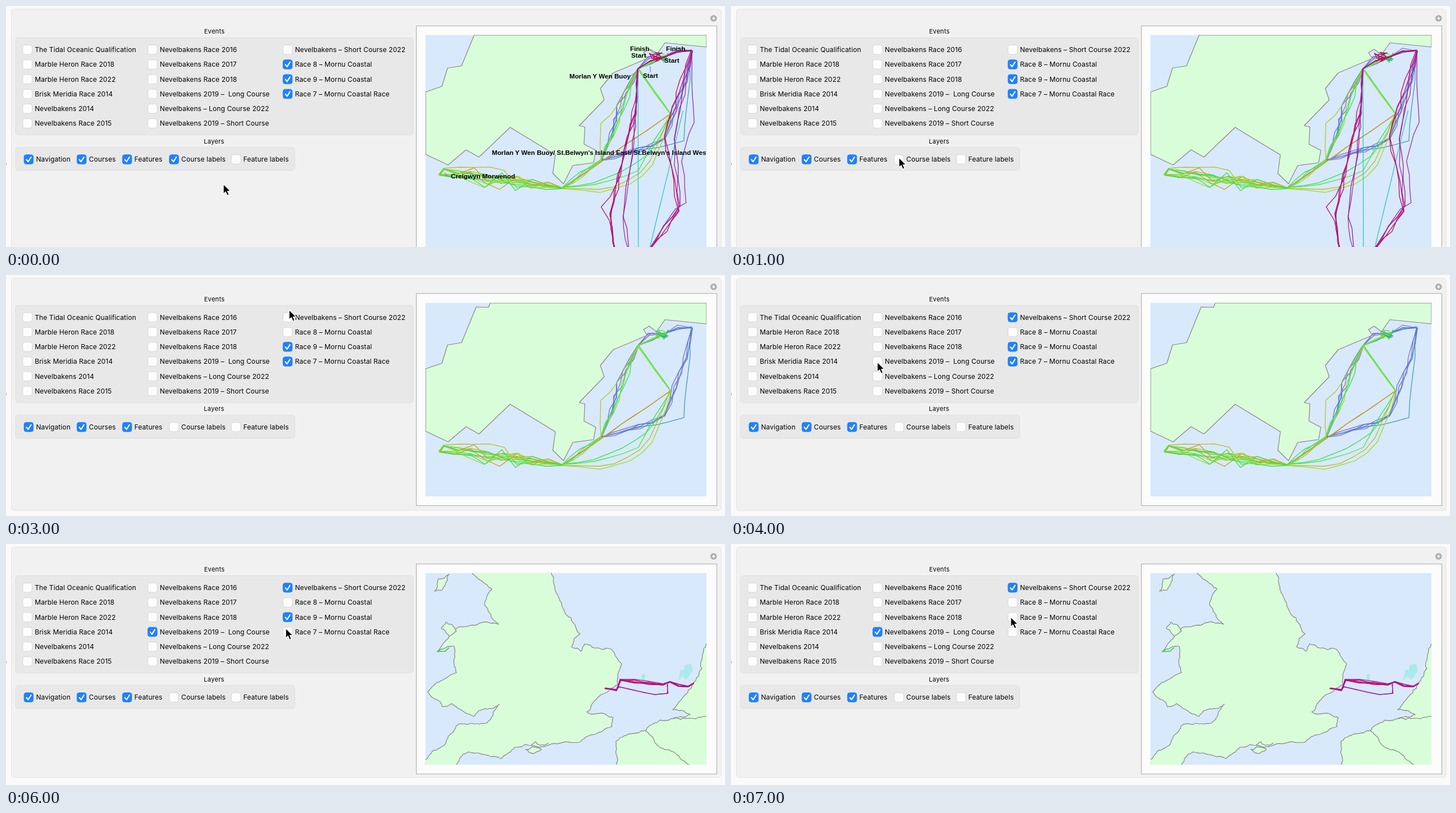
Animation, 1280 px wide and 429 px high, one loop 8000 ms. Source, as an HTML page:

```html
<!DOCTYPE html>
<html lang="en">
<head>
<meta charset="utf-8">
<title>Race map explorer</title>
<style>
  html, body { margin: 0; width: 100%; height: 100%; overflow: hidden; background: #fafafa; }
  svg { display: block; width: 1280px; height: 429px; }
  text { font: 12px Inter, sans-serif; letter-spacing: .1px; fill: #000; white-space: pre; }
  .head { font-size: 11px; text-anchor: middle; letter-spacing: .3px; }
  .place { font: bold 11.7px "Liberation Sans", sans-serif; letter-spacing: 0; }
  .land { fill: #dafdd9; stroke: #858585; stroke-width: 1.2; stroke-linejoin: round; }
  .line { fill: none; stroke: #858585; stroke-width: 1.2; }
  .track { fill: none; stroke-width: 1.3; stroke-linejoin: round; }
</style>
</head>
<body>
<svg id="stage" viewBox="0 0 1280 429"></svg>
<script>
const STEP = 1000;
const events = [
  'The Tidal Oceanic Qualification', 'Marble Heron Race 2018', 'Marble Heron Race 2022',
  'Brisk Meridia Race 2014', 'Nevelbakens 2014',
  ...[2015, 2016, 2017, 2018].map(year => `Nevelbakens Race ${year}`),
  'Nevelbakens 2019 –  Long Course', 'Nevelbakens – Long Course 2022', 'Nevelbakens 2019 – Short Course',
  'Nevelbakens – Short Course 2022', 'Race 8 – Mornu Coastal', 'Race 9 – Mornu Coastal',
  'Race 7 – Mornu Coastal Race'];
const columns = [38.2, 260.8, 501.4];
const layers = [['Navigation', 40.4], ['Courses', 134.6], ['Features', 215.6],
  ['Course labels', 299.1], ['Feature labels', 409.6]];

// Panel geometry for each of the three views
const views = {
  bay:   { shift: 0,    panel: 460,   frame: [35.5, 460],   map: [51.5, 460], mark: 281 },
  coast: { shift: -2.4, panel: 419,   frame: [33, 410.5],   map: [49.5, 394], mark: 212 },
  sea:   { shift: 0,    panel: 415.5, frame: [35.5, 409.3], map: [51.5, 393], mark: 210 }
};
const states = [
  { view: 'bay',   cursor: [387, 317], on: [13, 14, 15], labels: true },
  { view: 'bay',   cursor: [299, 270], on: [13, 14, 15] },
  { view: 'bay',   cursor: [471, 115], on: [13, 14, 15] },
  { view: 'coast', cursor: [504, 62],  on: [14, 15] },
  { view: 'coast', cursor: [260.5, 155], on: [12, 14, 15] },
  { view: 'sea',   cursor: [498, 150], on: [9, 12, 14, 15] },
  { view: 'sea',   cursor: [498, 150], on: [9, 12, 14] },
  { view: 'sea',   cursor: [498, 130], on: [9, 12] }
];

let seed = 11;
const random = () => (seed = seed * 16807 % 2147483647) / 2147483647;
const spread = size => (random() - .5) * 2 * size;
const parse = text => text.split(' ').map(pair => pair.split(',').map(Number));
const join = points => points.map(p => p.map(v => v.toFixed(1)).join()).join(' ');

const rect = (x, y, w, h, fill, extra = '') =>
  `<rect x="${x}" y="${y}" width="${w}" height="${h}" fill="${fill}" ${extra}/>`;
const label = (x, y, text, kind = '') => `<text x="${x}" y="${y}" class="${kind}">${text}</text>`;
const shape = (tag, kind, points, extra = '') => `<${tag} class="${kind}" points="${points}" ${extra}/>`;
const track = (points, color) => shape('polyline', 'track', join(points), `stroke="#${color}"`);

// Sail from stop to stop, drifting sideways most in the middle of each leg
function sail(stops, wander, bow) {
  const marks = stops.map(([x, y]) => [x + spread(1.3), y + spread(1.3)]);
  return marks.flatMap(([x, y], i) => {
    if (!marks[i + 1]) return [[x, y]];
    const dx = marks[i + 1][0] - x, dy = marks[i + 1][1] - y, length = Math.hypot(dx, dy);
    const count = Math.ceil(length / 28);
    return Array.from({ length: count }, (_, k) => {
      const u = k / count, side = Math.sin(Math.PI * u) * (bow + spread(wander)) / length;
      return [x + dx * u - dy * side, y + dy * u + dx * side];
    });
  });
}
const fleet = (stops, colors, wander = 2, bow = 0) => colors.split(' ').map((color, i, all) =>
  track(sail(stops, wander, bow * (.6 + .4 * i / Math.max(1, all.length - 1))), color)).join('');

const scribble = (x, y, w, h, colors) => colors.split(' ').map(color =>
  track(Array.from({ length: 9 }, () => [x + spread(w), y + spread(h)]), color)).join('');

// Midpoint displacement turns a coarse outline into a ragged coast
function ragged(text, amount = .14, depth = 4) {
  let points = parse(text);
  while (depth--) points = points.flatMap((a, i) => {
    const b = points[i + 1];
    if (!b) return [a];
    const size = Math.min(Math.hypot(b[0] - a[0], b[1] - a[1]), 26) * amount;
    return [a, [(a[0] + b[0]) / 2 + spread(size), (a[1] + b[1]) / 2 + spread(size)]];
  });
  return join(points);
}
const coast = text => shape('polygon', 'land', ragged(text));
const border = text => shape('polyline', 'line', ragged(text));

// Marks of the bay course
const [start, mole, buoy, turn, bend, isle, cape, west, hook] =
  parse('1172,105 1221,93 1125,126 1183,206 1172,250 1060,288 990,338 772,314 779,304');
const south = [1147, 446];
const blues = '786bcc 6b72cf 8577c8 4f82cc', reds = 'b8006e c30061', purples = '9c2ea8 a5168c';
const greens = '2fe252 49e63f 8bdc2c', olives = 'c0a028 bdbc22 9bd922';

const bayMap = shape('polygon', 'land',
    '747,167 776,157 786,124.5 811,120.5 837,57 859,57.5 866,40 1247,40 1247,87 1173,79.5 1158,101 ' +
    '1145,91 1135,97 1140,105 1152,103 1081,133 1058,161 1065,181 1020.5,227 1030.5,229.5 ' +
    '1029,260 1050,271 1046,293 1009,298 992.5,330.5 973.5,312 978,279 897.5,230 842,283 819,270 787,297 747,278') +
  fleet([start, mole, [1206, 254], isle], '3e9cba', 3) +
  fleet([start, mole, bend, isle], blues, 6, -6) +
  fleet([isle, buoy, start], blues, 9, -6) +
  fleet([turn, cape], 'be902b c0a028', 1) +
  fleet([turn, cape], '2fe252 49e63f bdbc22 9bd922', 5, -64) +
  fleet([cape, west, hook, cape], greens, 4) +
  fleet([cape, west, hook, cape], olives + ' 2fe252', 17) +
  fleet([cape, isle, buoy], greens, 6) +
  fleet([isle, [1060, 222], [1076, 207], buoy], 'b4c823', 3) +
  fleet([start, buoy, turn], greens, 1) +
  scribble(1167, 106, 14, 9, 'b4c823 49e63f 2fae98');

const redTracks =
  fleet([buoy, [1126, 460]], '2cc6c8', 0) +
  fleet([[1206, 200], south], '2cc6c8', 0) +
  fleet([start, buoy, [1121, 205], [1100, 268], [1076, 385], [1088, 460]], reds + ' a20c78', 5) +
  fleet([buoy, [1086, 330], [1060, 373], [1082, 450]], 'b0147b', 4, -8) +
  fleet([buoy, [1116, 279], [1098, 390], [1109, 450]], purples, 4) +
  fleet([start, mole, [1172, 245], [1198, 379], south], reds, 6) +
  fleet([mole, [1224, 220], [1203, 290], [1211, 365], [1191, 375], south], '9c2ea8', 3) +
  fleet([mole, [1190, 250], [1200, 370], south], purples, 5) +
  scribble(1160, 105, 16, 9, reds);

const harbour = parse('1067,257 1087,260 1094,242 1170,250 1182,245 1214,254 1224,248');
const seaMap =
  coast('829,50 865,80 852,109 877,143 803,149 768,191 798,182 802,229 751,263 777,290 793,284 833,307 ' +
    '878,285 855,319 801,324 783,354 745,384 745,395 802,395 823,370 881,382 906,362 1020,353 1079,325 ' +
    '1081,309 1034,299 1060,268 1089,250 1096,214 1077,187 1030,178 1023,191 1007,183 1022,160 985,97 970,50') +
  coast('775,150 783,139 802,155 789,164 775,150') +
  coast('789,54 770,62 763,84 776,82 789,54') +
  coast('925,366 939,361 953,366 940,373 925,366') +
  coast('1250,168 1233,236 1208,270 1187,295 1218,304 1187,311 1165,313 1140,331 1086,351 1087,395 1250,395') +
  border('1138,332 1166,363 1189,370 1219,394') +
  border('1187,311 1211,311 1247,307') +
  border('935,358 943,352 950,358 966,354') +
  '<path fill="#ace9ea" d="M1131 233l7-2-1 13-4 6zM1197 243l4-20 6 2 1-9 12-3 3 12-12 17-7-7z"/>' +
  fleet([[768, 192], [782, 192], [788, 184]], greens + ' 2fe252', 2) +
  fleet(harbour, 'd00066 c60070 a31386 d00066 b60a7a d00066 8c27a0', 4) +
  fleet([harbour[1], [1092, 254], [1155, 267], [1178, 267], [1178, 250]], 'b60a9a 9a20a0', 1);

const names = ['Morlan Y Wen Buoy', "St.Belwyn's Island East", "St.Belwyn's Island West"];
const places = [[1111, 80, 'Finish'], [1113, 92, 'Start'], [1175, 80, 'Finish'], [1172, 100.5, 'Start'],
  [1134, 127.5, 'Start'], [1003, 129, names[0]], [865, 265, names.join('/ ')], [792, 307, 'Creigwyn Morwenod']]
  .map(p => label(...p, 'place')).join('') +
  '<path class="line" d="M781 297l5 6h5M1112 125l10-8M1147 118v-11M1146 77l12 6"/>';

function checkbox(x, y, on) {
  const box = rect(x - 8.3, y - 8.3, 16.6, 16.6, on ? '#1f82fb' : '#fdfdfd',
    `rx="4" stroke="${on ? '#1f7cf2' : '#cfcfcf'}" stroke-width=".8"`);
  return box + (on ? `<path d="M${x - 4} ${y + .5}l3 3.7 5.2-8.2" fill="none" stroke="#fff" stroke-width="2.1"
    stroke-linecap="round" stroke-linejoin="round"/>` : '');
}

function controls(state) {
  const edge = 'rx="5" stroke="#dedede"';
  const option = (x, y, text, on) => checkbox(x, y, on) + label(x + 13, y + 4.4, text);
  return label(371, 49, 'Events', 'head') + label(370.5, 244.5, 'Layers', 'head') +
    rect(17, 56.5, 708, 173, '#e8e8e8', edge) + rect(17, 251.8, 497, 41, '#e8e8e8', edge) +
    events.map((name, i) =>
      option(columns[i / 6 | 0], 77.7 + i % 6 * 26.25, name, state.on.includes(i))).join('') +
    layers.map(([name, x], i) => option(x, 273, name, i < 3 || i === 3 && state.labels)).join('');
}

function map(state) {
  const [top, bottom] = views[state.view].map;
  const edge = x => `<path class="line" d="M${x} ${top + .5}H1247"/>`;
  const content = {
    bay: `<g transform="translate(0 -14)">${bayMap}${redTracks}</g>` + edge(833),
    coast: bayMap + edge(863),
    sea: seaMap
  }[state.view];
  return `<clipPath id="window">${rect(746.7, top, 500.3, bottom - top, '#000')}</clipPath>
    <g clip-path="url(#window)">${rect(746, top, 502, bottom - top, '#d8e9fb')}${content}
    ${state.labels ? places : ''}</g>`;
}

function draw(state) {
  const { shift, panel, frame, mark } = views[state.view];
  const [x, y] = state.cursor;
  return rect(9.5, 5.5, 1263.5, panel - 5.5, '#f1f1f1', 'rx="5" stroke="#e3e3e3"') +
    rect(0, mark - 1.5, 1, 3.5, '#8a9bb0') +
    `<g transform="translate(0 ${shift})">${controls(state)}</g>
    <g transform="translate(1259.7 ${shift ? 21 : 22})"><circle r="5.8" fill="#a9a9a9"/>
    <path d="M-3.3 0h6.6M0-3.3v6.6" stroke="#fff" stroke-width="1.7"/></g>` +
    rect(730.5, frame[0], 535, frame[1] - frame[0], '#fcfcfc', 'stroke="#a9a9a9"') + map(state) +
    `<path transform="translate(${x} ${y})" d="M0 0V17.5L4 13.8 6.8 20.3 10 18.9 7.2 12.6H12.6Z"
    fill="#000" stroke="#fff" stroke-width="1.2" stroke-linejoin="round"/>`;
}

const stage = document.getElementById('stage');
let shown = -1;
function tick() {
  const index = Math.floor(performance.now() / STEP) % states.length;
  if (index !== shown) stage.innerHTML = draw(states[shown = index]);
  requestAnimationFrame(tick);
}
tick();
</script>
</body>
</html>
```
